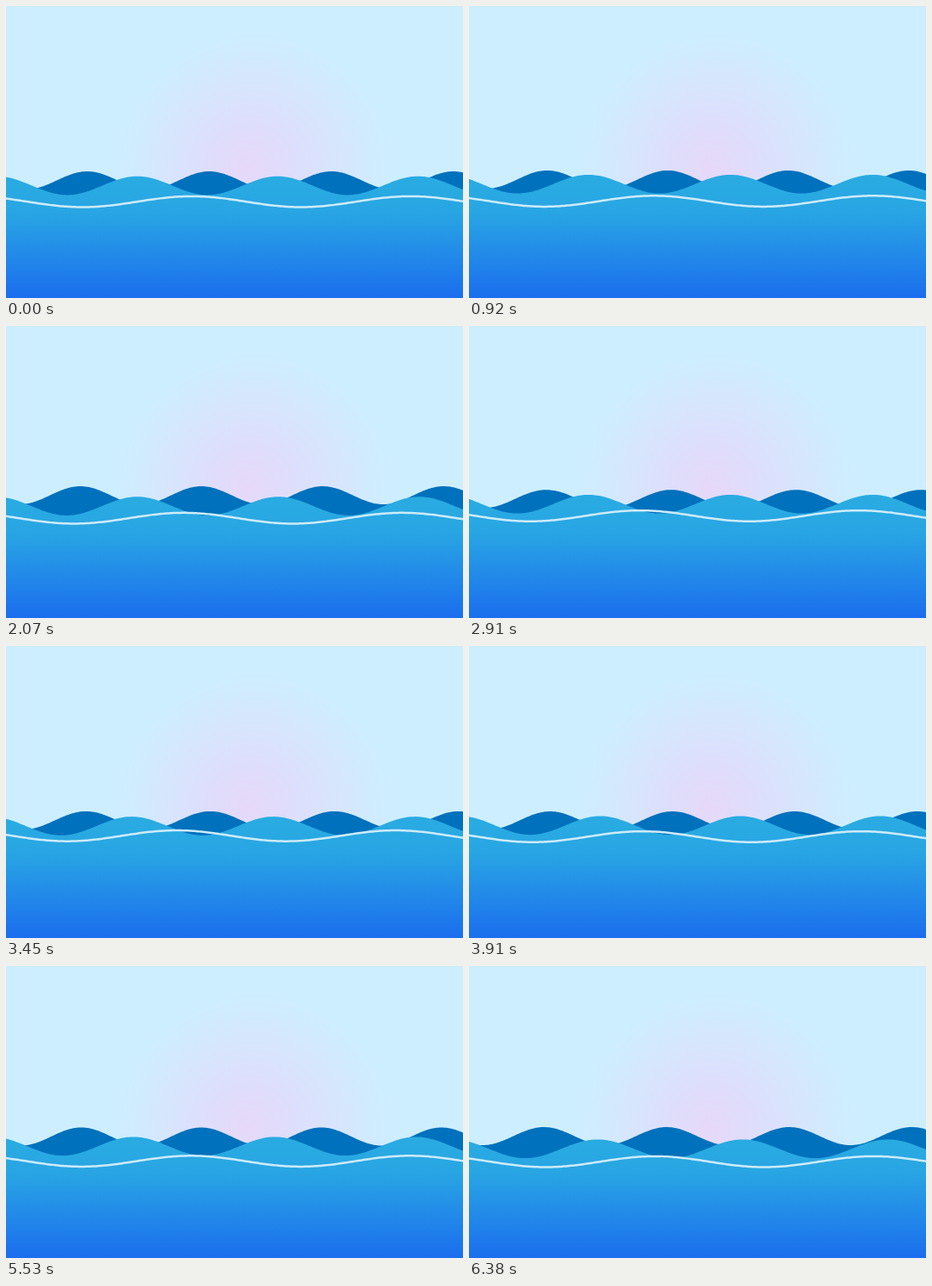
These frames come from a looping animation (529 by 339 pixels, 6.46 s). An HTML page:

```html
<!DOCTYPE html>
<html lang="en">
<head>
<meta charset="utf-8">
<title>Waves</title>
<style>
  html, body { margin: 0; width: 100%; height: 100%; overflow: hidden; background: #cdeeff; }
  svg { display: block; width: 529px; height: 339px; }
</style>
</head>
<body>
<svg viewBox="0 0 529 339">
  <defs>
    <radialGradient id="glow" gradientUnits="userSpaceOnUse" cx="288" cy="190" r="158" fx="279" fy="187">
      <stop offset="0" stop-color="#e7d8f8"/>
      <stop offset=".28" stop-color="#dfddfb"/>
      <stop offset=".65" stop-color="#d6e6fd"/>
      <stop offset="1" stop-color="#cdeeff"/>
    </radialGradient>
    <linearGradient id="sea" gradientUnits="userSpaceOnUse" x1="0" y1="205" x2="0" y2="339">
      <stop offset="0" stop-color="#29abe2"/>
      <stop offset=".26" stop-color="#28a5e3"/>
      <stop offset="1" stop-color="#1b6eee"/>
    </linearGradient>
  </defs>
  <rect width="529" height="339" fill="#cdeeff"/>
  <rect width="529" height="339" fill="url(#glow)"/>
  <path id="back" fill="#0071bc"/>
  <path id="front" fill="url(#sea)"/>
  <path id="foam" fill="none" stroke="#cdebf9" stroke-width="2.5"/>
</svg>
<script>
const { sin, cos, PI, floor } = Math;
const WIDTH = 529, HEIGHT = 339, EDGE = 4;
const LOOP = 6460, STEP = LOOP / 84, LEAD = 12;

// Each wave sways around a mean pose; a is its phase angle.
const waves = {
  back: {
    period: 4000, depth: 21, filled: true,
    crest: a => 90 + 4 * cos(a),
    top: a => 189.8 + 3 * cos(a) - 0.8 * cos(2 * a),
    gap: a => 141.3 + 0.7 * cos(a) - 2.6 * sin(a) - 0.7 * cos(2 * a)
  },
  front: {
    period: 2000, depth: 21.7, filled: true,
    crest: a => 145.8 + 7 * cos(a) - 0.8 * cos(2 * a),
    top: a => 198.2 + 1.2 * cos(a) + 1.6 * sin(a) - 1.7 * cos(2 * a),
    gap: a => 164.7 - 0.6 * cos(a) + 2.5 * sin(a) - 1.6 * cos(2 * a)
  },
  foam: {
    period: LOOP, depth: 12.6, filled: false,
    crest: a => 208 + 9 * cos(a) - 2 * cos(2 * a),
    top: a => 218 + 3.5 * cos(a) - 0.6 * cos(2 * a),
    gap: () => 253.4
  }
};

function wavePath(wave, t) {
  const a = 2 * PI * t / wave.period;
  const crest = wave.crest(a), top = wave.top(a), gap = wave.gap(a);
  const points = [];
  for (let x = -EDGE; x <= WIDTH + EDGE; x += 2) {
    const y = top + wave.depth * (1 - cos(2 * PI * (x - crest) / gap)) / 2;
    points.push(x + ' ' + y.toFixed(2));
  }
  const line = 'M' + points.join('L');
  return wave.filled ? `${line}V${HEIGHT}H${-EDGE}Z` : line;
}

function draw() {
  const t = floor(((performance.now() + LEAD) % LOOP) / STEP) * STEP;
  for (const [id, wave] of Object.entries(waves)) {
    document.getElementById(id).setAttribute('d', wavePath(wave, t));
  }
  requestAnimationFrame(draw);
}
draw();
</script>
</body>
</html>
```
